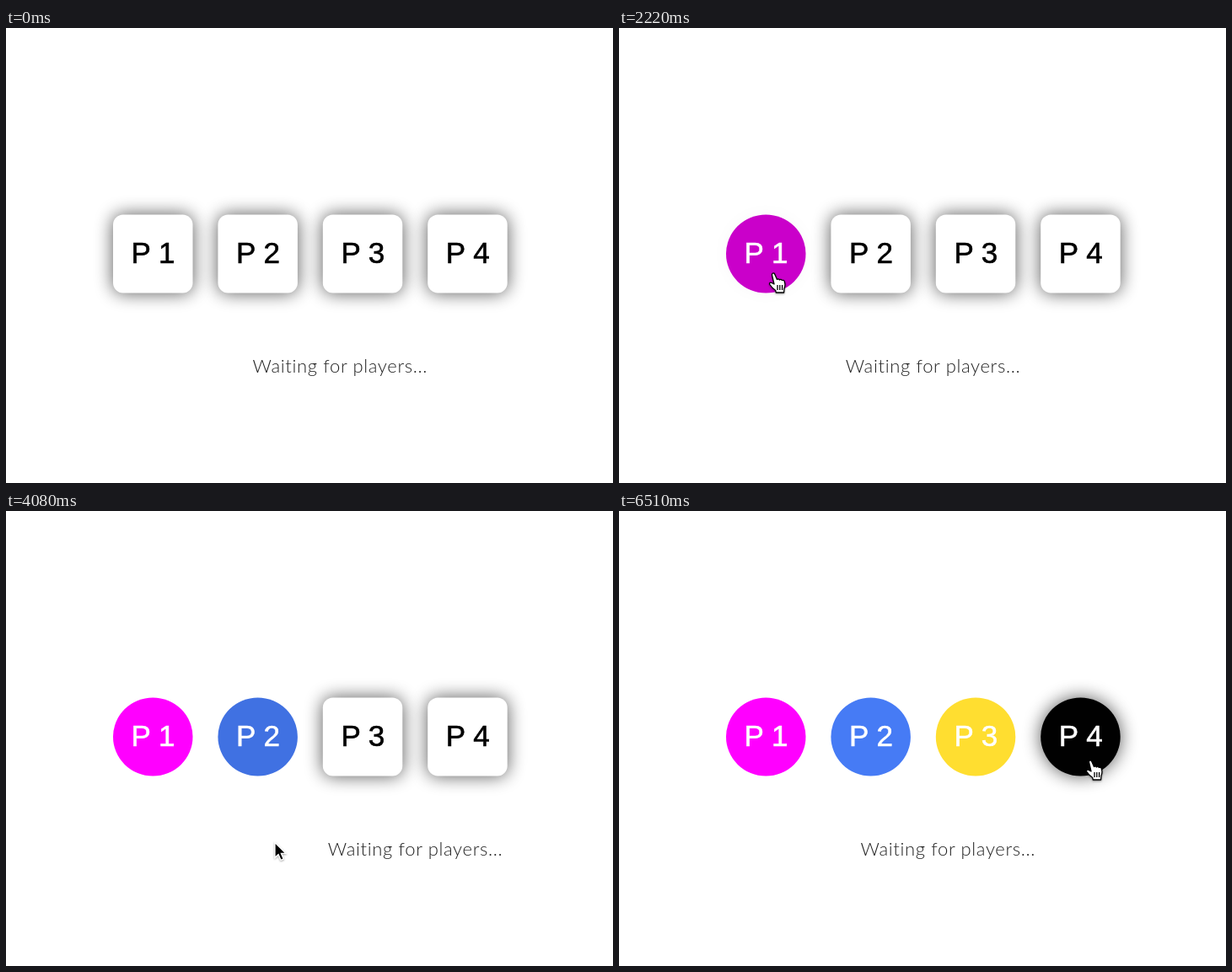
Animation, 720 px wide and 540 px high, one loop 6.54 s. Source, as an HTML page:

```html
<!DOCTYPE html>
<html lang="en">
<head>
<meta charset="utf-8">
<title>Waiting for players</title>
<style>
  html, body { margin: 0; width: 100%; height: 100%; overflow: hidden; background: #fff; }
  svg { display: block; width: 720px; height: 540px; }
  .label { font: 35px "Liberation Sans", Arial, sans-serif; text-anchor: middle; stroke-width: .6; }
  .status { font: 300 22px Lato, sans-serif; letter-spacing: .65px; fill: #222; }
</style>
</head>
<body>
<svg id="stage" viewBox="0 0 720 540">
  <defs>
    <filter id="blur" x="-50%" y="-50%" width="200%" height="200%"><feGaussianBlur stdDeviation="10.5"/></filter>
    <filter id="drop" x="-50%" y="-50%" width="200%" height="200%">
      <feDropShadow dx="0" dy="1" stdDeviation="1" flood-opacity=".4"/>
    </filter>
    <clipPath id="view"><rect width="720" height="485"/></clipPath>
  </defs>
  <g id="buttons"></g>
  <text id="status" class="status" y="409">Waiting for players...</text>
  <g clip-path="url(#view)">
    <g id="cursor" filter="url(#drop)">
      <path id="arrow" stroke="#fff" stroke-width="1.2"
        d="M0 0V17.8L4.1 14L7 20.8L10.2 19.4L7.3 12.8H12.8Z"/>
      <g id="hand" stroke="#000" stroke-width="1.3" stroke-linejoin="round" fill="#fff">
        <path d="M-1.6 1.6Q-.8-1 1.4.4L4.5 7.5Q6 6 7.3 8Q9 6.5 10.3 8.5Q13 7.6 13.4 10.5Q14.7 14 13 18L12.6 23H3.2L2.8 20.5Q-1 18-4.5 13Q-4.5 10.5-1.8 11.5L1 13Z"/>
        <path d="M5 14V20M7.8 14V20M10.6 14V20"/>
      </g>
    </g>
  </g>
</svg>
<script>
const LOOP = 6540, FRAME = 30, FADE = 440;
const BOX = { x: 127, y: 221.5, w: 94.5, h: 93, pitch: 124.4 };

// The pointer arrives at tip, clicks and leaves; at cut the marquee skips ahead.
const players = [
  { color: "#ff00ff", tip: { x: 183, y: 291 }, arrive: 1138, click: 2005, cut: 2730, skip: 20 },
  { color: "#467bf5", tip: { x: 319, y: 297 }, arrive: 3390, click: 3790, cut: 4305, skip: 41 },
  { color: "#ffde30", tip: { x: 450, y: 288 }, arrive: 4850, click: 5217, cut: 5740, skip: 9, entry: 110 },
  { color: "#000000", tip: { x: 559, y: 296 }, arrive: 6150, click: Infinity, cut: Infinity, entry: 16 }
];
const POINTER = { approach: 400, linger: 230, exit: 120, floor: 490 };
const MARQUEE = { x: 292.5, step: 5.952, interval: 27, reach: 39 };

const $ = id => document.getElementById(id);
const mix = (a, b, p) => a + (b - a) * p;
const boxX = i => BOX.x + i * BOX.pitch;

function set(el, attrs) {
  for (const key in attrs) el.setAttribute(key, attrs[key]);
}
function add(parent, tag, attrs) {
  const el = document.createElementNS("http://www.w3.org/2000/svg", tag);
  set(el, attrs);
  return parent.appendChild(el);
}

// cubic-bezier(.25, .1, .25, 1)
function ease(x) {
  if (x <= 0) return 0;
  if (x >= 1) return 1;
  const bezier = (s, a, b) => 3 * s * (1 - s) ** 2 * a + 3 * s * s * (1 - s) * b + s ** 3;
  let lo = 0, hi = 1;
  for (let i = 0; i < 24; i++) {
    const mid = (lo + hi) / 2;
    if (bezier(mid, .25, .25) < x) lo = mid; else hi = mid;
  }
  return bezier(lo, .1, 1);
}

players.forEach((player, i) => {
  const shape = { x: boxX(i), y: BOX.y, width: BOX.w, height: BOX.h };
  player.glow = add($("buttons"), "rect", { ...shape, filter: "url(#blur)" });
  player.face = add($("buttons"), "rect", shape);
  player.label = add($("buttons"), "text", { class: "label", x: boxX(i) + BOX.w / 2 + .3, y: 279 });
  player.label.textContent = "P " + (i + 1);
  player.rgb = [1, 3, 5].map(k => parseInt(player.color.substr(k, 2), 16));
});

function drawPlayer(player, t) {
  const hovered = ease((t - player.arrive + 50) / FADE);
  const joined = ease((t - player.click) / FADE);
  const fill = player.rgb.map(c => Math.round(mix(255 * (1 - hovered), c, joined)));
  const level = Math.round(255 * hovered);
  const ink = `rgb(${level},${level},${level})`;
  const corner = { rx: mix(12, BOX.w / 2, hovered), ry: mix(12, BOX.h / 2, hovered) };
  set(player.glow, { ...corner, opacity: .66 * (1 - joined) ** 2 });
  set(player.face, { ...corner, fill: `rgb(${fill})` });
  set(player.label, { fill: ink, stroke: ink });
}

// The status bounces between both ends in whole steps.
function drawStatus(t) {
  const { x, step, interval, reach } = MARQUEE;
  const skipped = players.reduce((sum, p) => t >= p.cut ? sum + p.skip : sum, 0);
  const phase = (t / interval + skipped + reach) % (4 * reach);
  const steps = Math.round(reach - Math.abs(phase - 2 * reach));
  set($("status"), { x: x + steps * step });
}

function drawCursor(t) {
  const { approach, linger, exit, floor } = POINTER;
  const player = players.find(p => t > p.arrive - approach && t < p.click + linger + exit);
  set($("cursor"), { visibility: player ? "visible" : "hidden" });
  if (!player) return;
  const { tip, arrive, click, entry = 3 } = player;
  const coming = Math.max(0, (arrive - t) / approach);
  const going = Math.max(0, (t - click - linger) / exit);
  const x = tip.x + entry * coming;
  const y = mix(tip.y, floor, coming + going);
  const over = y < BOX.y + BOX.h;
  set($("cursor"), { transform: `translate(${x} ${y})` });
  set($("arrow"), { display: over ? "none" : "inline" });
  set($("hand"), { display: over ? "inline" : "none" });
}

function draw(time) {
  const t = Math.floor((time % LOOP) / FRAME) * FRAME;
  players.forEach(player => drawPlayer(player, t));
  drawStatus(t);
  drawCursor(t);
}

const began = performance.now();
function tick() {
  draw(performance.now() - began);
  requestAnimationFrame(tick);
}
tick();
</script>
</body>
</html>
```
